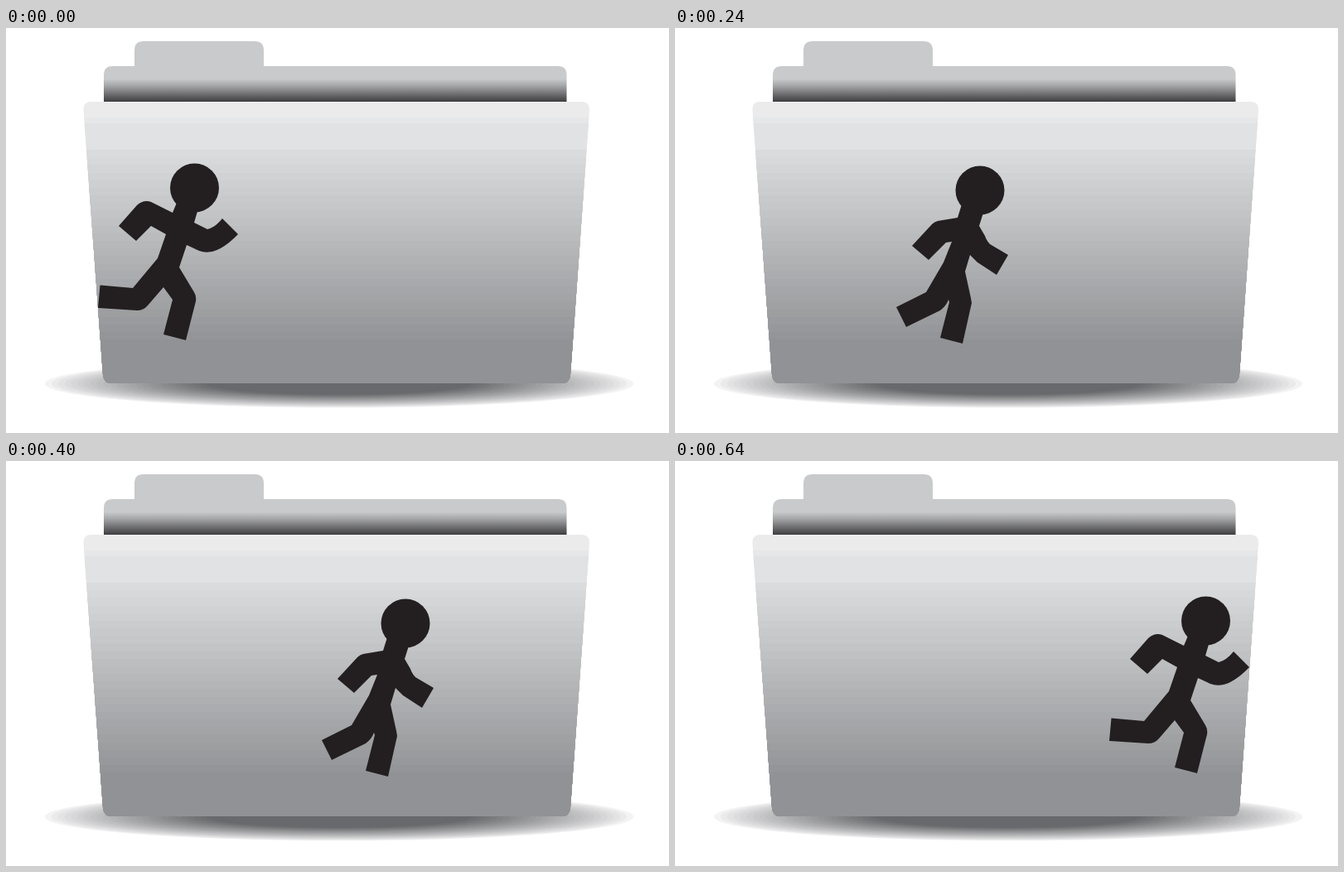
Recreate the animation shown at these times as an HTML page. Size 800x489 px, loop 720 ms.

```html
<!DOCTYPE html>
<html lang="en">
<head>
<meta charset="utf-8">
<title>Running figure on a folder</title>
<style>
html, body { margin: 0; width: 100%; height: 100%; overflow: hidden; background: #fff; }
svg { display: block; width: 100vw; height: 100vh; }
</style>
</head>
<body>
<svg viewBox="0 0 800 489">
  <defs>
    <linearGradient id="inside" gradientUnits="userSpaceOnUse" x1="0" y1="46" x2="0" y2="89">
      <stop offset=".36" stop-color="#c9cacc"/>
      <stop offset=".55" stop-color="#a5a6a8"/>
      <stop offset="1" stop-color="#3e3d3f"/>
    </linearGradient>
    <clipPath id="front">
      <path d="M93.500 99Q93 89 103 89H694Q704.500 89 704 99L681 419Q680 429 671 429H127Q118 429 117 419Z"/>
    </clipPath>
  </defs>
  <g id="shadow"></g>
  <path fill="#c9cacc" d="M155 50V27Q155 16 166 16H300Q311 16 311 27V50Z"/>
  <path fill="url(#inside)" d="M118 90V57Q118 46 129 46H666Q676.500 46 676.500 57V90Z"/>
  <g clip-path="url(#front)"><g id="bands" shape-rendering="crispEdges"></g></g>
  <g id="runner" fill="#231f20"><circle r="29.500"/><path/></g>
</svg>
<script>
const $ = s => document.querySelector(s);

function add(parent, tag, attrs) {
  const el = document.createElementNS('http://www.w3.org/2000/svg', tag);
  for (const k in attrs) el.setAttribute(k, attrs[k]);
  $(parent).append(el);
}

const mix = (a, b, t) => `rgb(${a.map((v, i) => Math.round(v + (b[i] - v) * t))})`;

// Soft shadow from nested ellipses
const rings = 26;
for (let i = 0; i < rings; i++) {
  const t = i / (rings - 1), s = 1 - t * 0.55;
  add('#shadow', 'ellipse', {
    cx: 402, cy: 429.5, rx: 355 * s, ry: 29 * s,
    fill: mix([243, 243, 244], [104, 105, 108], t ** 0.85)
  });
}

// Stepped shading of the folder front
const band = (y, fill) => add('#bands', 'rect', { x: 90, y, width: 620, height: 429 - y, fill });
band(89, '#ebebec');
band(108, '#e6e7e8');
band(115, '#e1e2e3');
for (let i = 0; i <= 25; i++) band(147 + i * 9.17, mix([218, 219, 220], [145, 146, 149], i / 25));

// Each pose: the head's place as drawn, and the body outline
const stride = {
  x: 227.5, y: 193,
  d: 'M206 211L201 223 175 210Q166 207 158 214L136 239 157 257 175 239 193 249 183 278 153 314 113.500 310.500 111 338 158 341Q166 341 171 335L190 313 201 328 190 370 217 377 229 330Q230 324 227 319L209 289 218 262 233 269Q253 277 280 249L261 230Q252 241 243 243L227 235 232 218Z'
};
const step = {
  x: 368, y: 196,
  d: 'M346 213L341 229 317 233Q313 234 310 237L286 263 306 280 327 259 334 258 324 283 303 319 267 337 279 361 320 341Q327 336 330 328L331 331 320 374 347 381 358 332 357 326 350 294 356 274 365 283 388 298 402 274 380 261Q376 257 374 251L367 239 373 220Z'
};
const pass = {
  x: 314, y: 196,
  d: 'M292 213L289 225 237 273 257 293 271 280 268 286 254 318 224 344 242 364 265 345 256 373 282 381 299 331 295 296 298 287 301 304 328 299 315 234 319 220Z'
};
const cycle = [stride, step, pass, step];
const headX = [227.5, 272, 314, 368, 434, 482, 529, 586.5, 640.5];

const head = $('#runner circle'), body = $('#runner path');

function draw() {
  const n = Math.floor(performance.now() % 720 / 80);
  const pose = cycle[n % 4];
  head.setAttribute('cx', pose.x);
  head.setAttribute('cy', pose.y);
  body.setAttribute('d', pose.d);
  $('#runner').setAttribute('transform', `translate(${headX[n] - pose.x} 0)`);
  requestAnimationFrame(draw);
}
draw();
</script>
</body>
</html>
```
